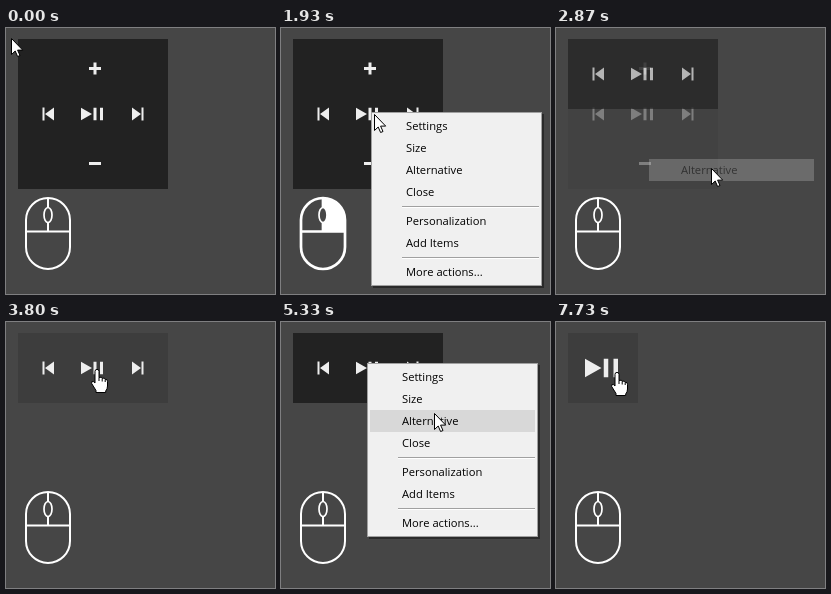
Write an HTML page that moves like this. It is 269 px wide and 266 px high and loops after 8 s.

```html
<!DOCTYPE html>
<html lang="en">
<head>
<meta charset="utf-8">
<title>Media panel and context menu</title>
<style>
  html, body { margin: 0; width: 100%; height: 100%; overflow: hidden; background: #464646; }
  svg { display: block; width: 269px; height: 266px; }
  .icons { fill: #eee; }
  .mouse { fill: none; stroke: #fff; stroke-width: 2; }
  .mouse.pressed { stroke-width: 2.7; }
  .pointer { fill: #fff; stroke: #000; stroke-linejoin: round; }
  text { font: 11.2px "Open Sans", "Noto Sans", sans-serif; fill: #000; }
</style>
</head>
<body>
<svg viewBox="0 0 269 266">
  <defs>
    <path id="play" d="M0 -6.2L11 0L0 6.2ZM12.5 -6.2h3v12.4h-3ZM19 -6.2h3v12.4h-3Z"/>
    <path id="skip" d="M0 -6.5L9 0L0 6.5ZM9.5 -6.5h2v13h-2Z"/>
    <g id="row">
      <use href="#skip" transform="translate(48) scale(-1 1)"/>
      <use href="#play" x="75"/>
      <use href="#skip" x="126"/>
    </g>
  </defs>

  <rect id="base" x="12" y="11" width="70" height="70"/>
  <g id="tall">
    <rect x="12" y="11" width="150" height="150"/>
    <g class="icons">
      <use href="#row" y="86"/>
      <path d="M83 39h4.5v-4.5h3V39H95v3h-4.5v4.5h-3V42H83ZM83 134h12v3H83Z"/>
    </g>
  </g>
  <g id="wide">
    <rect x="12" y="11" width="150" height="70"/>
    <use class="icons" href="#row" y="46"/>
  </g>
  <use id="small" class="icons" href="#play" transform="translate(29 46) scale(1.5)"/>

  <g id="mouse" class="mouse">
    <path id="leftButton" fill="#fff" stroke="none" d="M42 170A22 22 0 0 0 20 192V203H42Z"/>
    <path id="rightButton" fill="#fff" stroke="none" d="M42 170A22 22 0 0 1 64 192V203H42Z"/>
    <rect x="20" y="170" width="44" height="71" rx="22"/>
    <path d="M20 203.5H64M42 170V203"/>
    <ellipse cx="42" cy="187" rx="4" ry="7.5" fill="#464646" stroke-width="1.7"/>
  </g>

  <g id="menu">
    <g id="sheet">
      <rect x="2" y="2" width="171" height="174" fill="#000" opacity=".4"/>
      <rect x=".5" y=".5" width="170" height="173" fill="#f0f0f0" stroke="#a0a0a0"/>
      <path d="M31 94.5H168M31 145.5H168" stroke="#a0a0a0"/>
      <path d="M31 95.5H168M31 146.5H168" stroke="#fff"/>
    </g>
    <rect id="highlight" x="3" width="165" height="22" fill="#d8d8d8"/>
    <g id="labels"></g>
  </g>

  <g id="cursor" class="pointer">
    <path id="arrow" d="M.5 .5V16.5L4.2 13L6.6 18.5L9 17.5L6.6 12.1H11.7Z"/>
    <g id="hand">
      <path d="M-2 14V2.4a2 2 0 0 1 4 0V8.5q2.8-1 3.2 .8q2.6-.8 3 1q2.3-.4 2.3 2V17q0 3-1.8 5V23.5H-1V21.5L-5.3 14.5q-.6-2.6 1.6-2Z"/>
      <path d="M2 8.5V12M5.2 9.3V12.5M8.2 10.3V13" fill="none"/>
    </g>
  </g>
</svg>

<script>
const $ = id => document.getElementById(id);
const LOOP = 8000, TICK = 1000 / 15;
const DARK = '#222', HOVER = '#3d3d3d';
const CHOSEN = 2;

const items = [
  ['Settings', 3], ['Size', 25], ['Alternative', 47], ['Close', 69],
  ['Personalization', 98], ['Add Items', 120], ['More actions...', 149]
];
// Menus fade in after "open" and are clicked away at "close" (in ticks).
const menus = [
  { x: 90, y: 84, open: 21, fade: 3, close: 41 },
  { x: 86, y: 41, open: 67, fade: 4, close: 86 }
];
const sizes = [[150, 150], [150, 70], [70, 70]];
// Cursor stops: tick, x, y
const stops = [
  [0, 5, 10], [12, 94, 86], [13, 94, 86], [15, 91, 84], [28, 91, 84], [37, 155, 140],
  [46, 155, 140], [59, 87, 41], [63, 87, 41], [64, 87, 40], [69, 87, 40],
  [82, 158, 95], [86, 158, 95], [92, 147, 111], [107, 147, 111], [116, 61, 50], [120, 61, 50]
];

for (const [name, top] of items) {
  const label = document.createElementNS('http://www.w3.org/2000/svg', 'text');
  label.setAttribute('x', 35);
  label.setAttribute('y', top + 15);
  label.textContent = name;
  $('labels').append(label);
}
const labels = [...$('labels').children];

const clamp = v => Math.max(0, Math.min(1, v));
const within = (v, from, to) => v >= from && v < to;
const show = (el, on) => { el.style.display = on ? '' : 'none'; };
const place = (el, x, y) => el.setAttribute('transform', `translate(${x} ${y})`);

function cursorAt(tick) {
  const i = stops.findIndex(s => s[0] > tick);
  const [t0, x0, y0] = stops[i - 1], [t1, x1, y1] = stops[i];
  const p = (tick - t0) / (t1 - t0), e = p * p * (3 - 2 * p);
  return [Math.round(x0 + (x1 - x0) * e), Math.round(y0 + (y1 - y0) * e)];
}

function drawMenu(tick, x, y) {
  const menu = menus.find(m => within(tick, m.open + 1, m.close + 3));
  show($('menu'), menu);
  if (!menu) return false;
  const isOpen = tick < menu.close;
  const hit = isOpen
    ? items.findIndex(([, top]) => x >= menu.x + 3 && within(y - menu.y, top, top + 22))
    : CHOSEN;
  place($('menu'), menu.x, menu.y);
  $('menu').style.opacity = isOpen
    ? clamp((tick - menu.open) / menu.fade)
    : 1 - (tick - menu.close + 1) / 4;
  show($('sheet'), isOpen);
  show($('highlight'), hit >= 0);
  if (hit >= 0) $('highlight').setAttribute('y', items[hit][1]);
  labels.forEach((label, i) => show(label, isOpen || i === CHOSEN));
  return isOpen;
}

function drawPanels(tick, hovered) {
  const [toWide, toSmall] = menus.map(m => clamp((tick - m.close) / 3));
  const fill = hovered ? HOVER : DARK;
  $('tall').style.opacity = 1 - toWide;
  $('wide').style.opacity = toWide * (1 - toSmall);
  $('small').style.opacity = toSmall;
  $('tall').firstElementChild.style.fill = tick >= menus[0].close ? HOVER : fill;
  $('wide').firstElementChild.style.fill = fill;
  $('base').style.fill = fill;
  show($('base'), tick >= menus[1].close);
}

function draw(tick) {
  const [x, y] = cursorAt(tick);
  const menuOpen = drawMenu(tick, x, y);
  const [w, h] = sizes[menus.filter(m => tick >= m.close).length];
  const hovered = !menuOpen && within(x, 12, 12 + w) && within(y, 11, 11 + h);
  drawPanels(tick, hovered);

  const left = within(tick, 40, 43);
  const right = within(tick, 19, 32) || within(tick, 67, 75);
  show($('leftButton'), left);
  show($('rightButton'), right);
  $('mouse').classList.toggle('pressed', left || right);

  place($('cursor'), x, y);
  show($('hand'), hovered);
  show($('arrow'), !hovered);
}

function frame() {
  draw(Math.floor((performance.now() % LOOP + 5) / TICK) % 120);
  requestAnimationFrame(frame);
}
frame();
</script>
</body>
</html>
```
